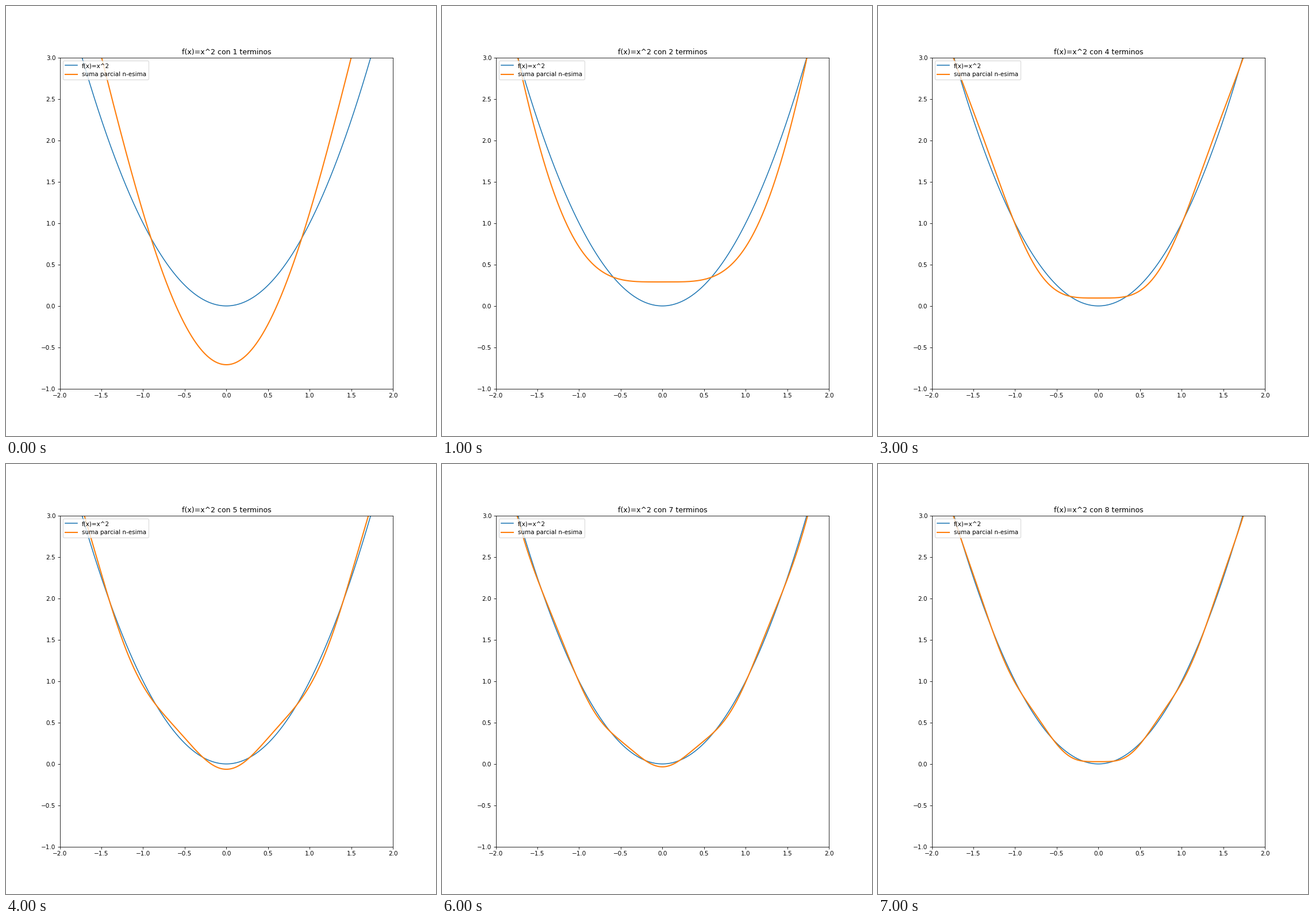
A matplotlib script that plays this animation: 748 by 748 pixels, repeating every 8000 ms.

```python
import numpy as np
import matplotlib.pyplot as plt
from matplotlib.animation import FuncAnimation

TERMS = 8
STEP_MS = 1000

x = np.linspace(-np.pi, np.pi, 1000)


def partial_sum(n):
    """Fourier series of x^2 on [-pi, pi], cut after n cosine terms."""
    k = np.arange(1, n + 1)[:, None]
    return np.pi**2 / 3 + np.sum(4 * (-1.0)**k / k**2 * np.cos(k * x), axis=0)


fig, ax = plt.subplots(figsize=(10, 10), dpi=74.8)
ax.plot(x, x**2, color="tab:blue", lw=1.5, label="f(x)=x^2")
curve, = ax.plot(x, partial_sum(1), color="tab:orange", lw=2,
                 label="suma parcial n-esima")
ax.set_xlim(-2, 2)
ax.set_ylim(-1, 3)
ax.set_xticks(np.arange(-2, 2.1, 0.5))
ax.set_yticks(np.arange(-1, 3.1, 0.5))
ax.legend(loc="upper left")
title = ax.set_title("f(x)=x^2 con 1 terminos")


def update(frame):
    n = frame + 1
    curve.set_ydata(partial_sum(n))
    title.set_text(f"f(x)=x^2 con {n} terminos")
    return curve, title


anim = FuncAnimation(fig, update, frames=TERMS, interval=STEP_MS,
                     repeat=True, repeat_delay=0, blit=False)
plt.show()
```
